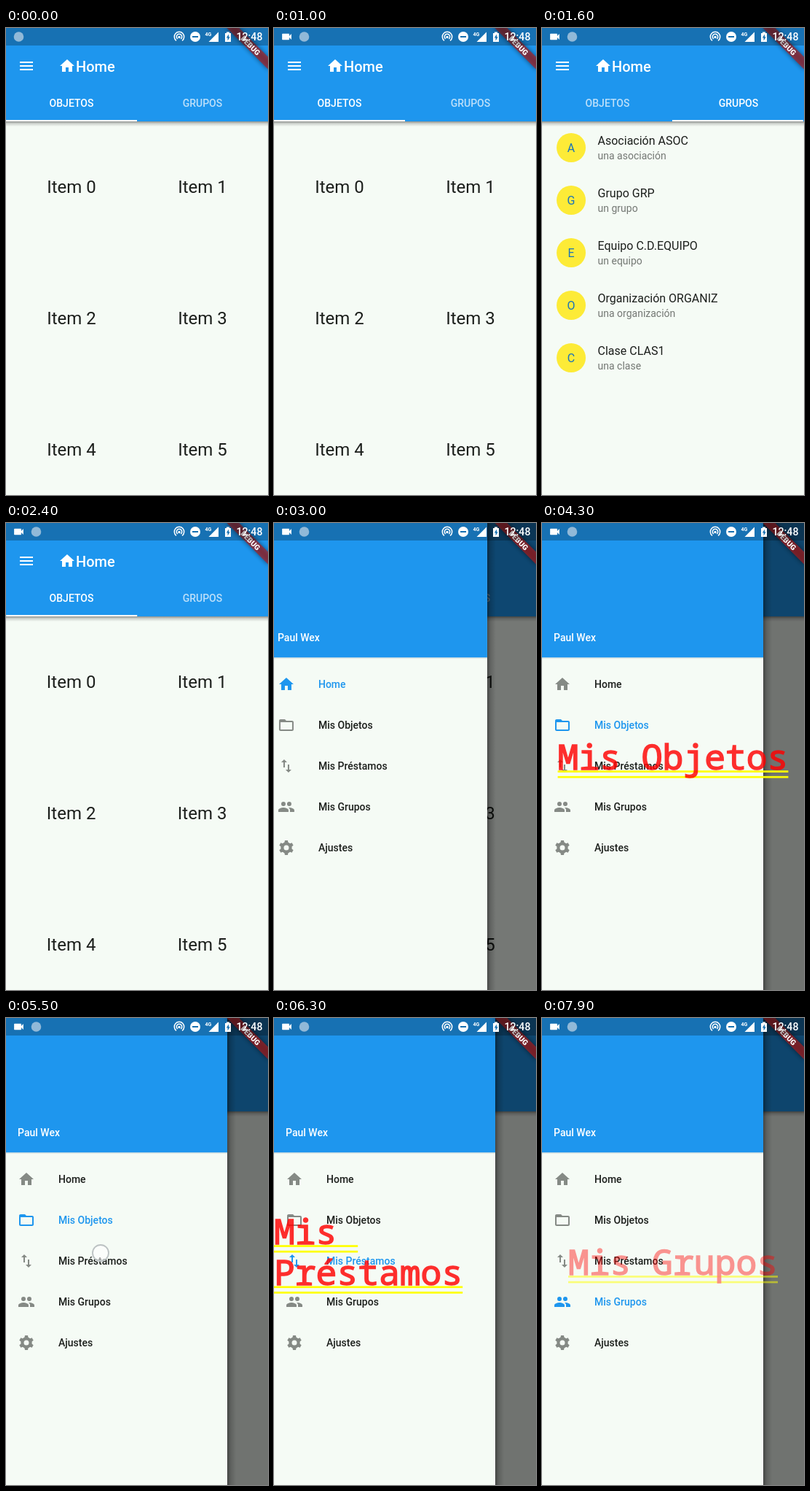
An HTML page for the animation above (8000 ms loop, 360 by 640 pixels).

```html
<!DOCTYPE html>
<html lang="es">
<head>
<meta charset="utf-8">
<title>Home</title>
<style>
html, body { margin: 0; width: 100%; height: 100%; overflow: hidden; background: #f5fbf5; }
svg { display: block; width: 100%; height: 100%; font-family: Roboto, sans-serif; }
text { white-space: pre; }
.mid { text-anchor: middle; }
.med { font-weight: 500; }
.toast text { font: 48px "Noto Sans Mono", monospace; fill: #f00; stroke: #f00; stroke-width: 1.5px; }
</style>
</head>
<body>
<svg id="stage" viewBox="0 0 360 640"></svg>
<script>
const BLUE = '#1e96ee', PAPER = '#f5fbf5', INK = '#1c1f1c', GREY = '#858a85';
const LOOP = 8000;

const ICONS = {
  menu: '<path d="M3 18h18v-2H3v2zm0-5h18v-2H3v2zm0-7v2h18V6H3z"/>',
  home: '<path d="M10 20v-6h4v6h5v-8h3L12 3 2 12h3v8z"/>',
  folder: '<path d="M20 6h-8l-2-2H4c-1.1 0-2 .9-2 2v12c0 1.1.9 2 2 2h16c1.1 0 2-.9 2-2V8c0-1.1-.9-2-2-2zm0 12H4V8h16v10z"/>',
  swap: '<path d="M9 3L5 7h3v7h2V7h3L9 3zm7 14v-7h-2v7h-3l4 4 4-4h-3z"/>',
  group: '<circle cx="16" cy="8" r="3"/><circle cx="8" cy="8" r="3"/>' +
    '<path d="M8 13c-2.3 0-7 1.2-7 3.5V19h14v-2.5c0-2.3-4.7-3.5-7-3.5zm8 0-1 .1c1.2.8 2 1.9 2 3.4V19h6v-2.5c0-2.3-4.7-3.5-7-3.5z"/>',
  gear: '<circle cx="12" cy="12" r="5.6" fill="none" stroke="currentColor" stroke-width="4.2"/>' +
    [0, 60, 120, 180, 240, 300].map(a =>
      `<path d="M10 2h4l.7 4H9.3z" transform="rotate(${a} 12 12)"/>`).join(''),
  video: '<path d="M17 10.5V7c0-.6-.4-1-1-1H4c-.6 0-1 .4-1 1v10c0 .6.4 1 1 1h12c.6 0 1-.4 1-1v-3.5l4 4v-11z"/>'
};

const icon = (name, cx, cy, color = '#fff', size = 24, attrs = '') =>
  `<g ${attrs} fill="currentColor" color="${color}" transform="translate(${cx - size / 2} ${cy - size / 2}) scale(${size / 24})">${ICONS[name]}</g>`;
const text = (str, x, y, size, fill, cls = '', attrs = '') =>
  `<text x="${x}" y="${y}" font-size="${size}" fill="${fill}" class="${cls}" ${attrs}>${str}</text>`;
const rect = (x, y, w, h, fill, attrs = '') =>
  `<rect x="${x}" y="${y}" width="${w}" height="${h}" fill="${fill}" ${attrs}/>`;
const fade = (id, dir, alpha) =>
  `<linearGradient id="${id}" ${dir}><stop stop-opacity="${alpha}"/><stop offset=".4" stop-opacity="${alpha * .4}"/><stop offset="1" stop-opacity="0"/></linearGradient>`;

const groups = [
  ['Asociación ASOC', 'una asociación'],
  ['Grupo GRP', 'un grupo'],
  ['Equipo C.D.EQUIPO', 'un equipo'],
  ['Organización ORGANIZ', 'una organización'],
  ['Clase CLAS1', 'una clase']
];
const menu = [
  ['home', 'Home'], ['folder', 'Mis Objetos'], ['swap', 'Mis Préstamos'],
  ['group', 'Mis Grupos'], ['gear', 'Ajustes']
];
const toasts = [
  { lines: ['Mis Objetos'], x: 21.6, y: 338, from: 3520, to: 4680 },
  { lines: ['Mis ', 'Préstamos'], x: 0, y: 310, from: 5720, to: 6860 },
  { lines: ['Mis Grupos'], x: 36, y: 338, from: 7800, to: 8960 }
];
const taps = [
  { x: 130, y: 270, from: 3180, to: 3380 },
  { x: 130, y: 322, from: 5180, to: 5560 },
  { x: 130, y: 383, from: 7300, to: 7620 }
];

function pages() {
  let out = '<g id="pages">';
  for (let i = 0; i < 6; i++)
    out += text('Item ' + i, 90 + i % 2 * 180, 226 + (i >> 1) * 180, 24, INK, 'mid');
  groups.forEach(([name, note], i) => {
    const y = 164 + i * 72;
    out += `<circle cx="398" cy="${y}" r="20" fill="#fdeb37"/>` +
      text(name[0], 398, y + 6, 16, '#1c74b8', 'mid') +
      text(name, 434.5, y - 4, 16, INK) + text(note, 434.5, y + 16, 14, '#747874');
  });
  return out + '</g>';
}

function appBar() {
  return rect(0, 128, 360, 7, 'url(#below)') + rect(0, 0, 360, 128, BLUE) +
    icon('menu', 28, 52) + icon('home', 84, 52) + text('Home', 96, 60, 20, '#fff', 'med') +
    text('OBJETOS', 90, 108, 14, '#fff', 'mid med', 'id="tab0"') +
    text('GRUPOS', 270, 108, 14, '#fff', 'mid med', 'id="tab1"') +
    rect(0, 126, 180, 2, '#fff', 'id="bar"');
}

function drawer() {
  const rows = menu.map(([name, label], i) => {
    const y = 221 + i * 56;
    return `<g class="row">${icon(name, 28, y, GREY)}${text(label, 72, y + 5, 14, INK, 'med')}</g>`;
  });
  return rect(0, 0, 360, 640, '#000', 'id="scrim"') +
    '<g id="drawer">' + rect(304, 0, 12, 640, 'url(#beside)') + rect(0, 0, 304, 640, PAPER) +
    rect(0, 0, 304, 184.5, BLUE) + rect(0, 184.5, 304, 1, '#d4dcd8') +
    text('Paul Wex', 16, 162, 14, '#fff', 'med') + rows.join('') + '</g>';
}

function toastMarkup({ lines, x, y }) {
  const body = lines.map((str, i) => {
    const base = y + i * 56.2, w = str.length * 28.8;
    return rect(x, base + 1.2, w, 2.7, '#ff0') + rect(x, base + 8.8, w, 2.7, '#ff0') +
      `<text x="${x}" y="${base}" opacity=".82">${str}</text>`;
  });
  return `<g class="toast">${body.join('')}</g>`;
}

function banner() {
  return '<g transform="translate(360 0) rotate(45)">' +
    rect(-40, 28, 80, 12, '#000', 'opacity=".5" filter="url(#soft)"') +
    rect(-40, 28, 80, 12, '#b71c1c', 'opacity=".63"') +
    text('DEBUG', 0, 37.6, 10.2, '#fff', 'mid', 'font-weight="900"') + '</g>';
}

function statusBar() {
  const ring = r => `<path d="M${238 - r * .6} ${12 + r * .8}A${r} ${r} 0 1 1 ${238 + r * .6} ${12 + r * .8}" fill="none" stroke="#fff" stroke-width="1.5"/>`;
  return rect(0, 0, 360, 24, '#000', 'opacity=".25"') +
    icon('video', 17.5, 12, '#fff', 17, 'id="video"') +
    '<circle id="spot" cy="12" r="6.8" fill="#91b9d8"/>' +
    ring(6.7) + ring(3.7) + '<circle cx="238" cy="12.5" r="1.7" fill="#fff"/>' +
    '<circle cx="260" cy="12" r="7" fill="#fff"/>' + rect(256, 11, 8, 2, '#1670b1') +
    text('4G', 273.5, 11, 7, '#fff', '', 'font-weight="700"') +
    '<path d="M292 5.5V19h-13.5z" fill="#fff"/>' +
    '<path d="M303 5.5h4V7h2v12h-8V7h2z" fill="#fff"/><path d="M306 8.5l-3.2 5h1.8V17.500l3.100-5.200H306z" fill="#1670b1"/>' +
    text('12:48', 352.500, 17, 14.2, '#fff', 'med', 'text-anchor="end"');
}

const stage = document.getElementById('stage');
stage.innerHTML =
  '<defs>' + fade('below', 'x2="0" y2="1"', .42) + fade('beside', '', .4) +
  '<filter id="soft" x="-20%" y="-100%" width="140%" height="300%"><feGaussianBlur stdDeviation="3"/></filter></defs>' +
  rect(0, 0, 360, 640, PAPER) + pages() + appBar() + drawer() +
  toasts.map(toastMarkup).join('') + banner() + statusBar() +
  taps.map(p => `<circle class="tap" cx="${p.x}" cy="${p.y}" r="11" fill="#fff" fill-opacity=".55" stroke="#bcc2c3" stroke-width="1.800"/>`).join('');

const el = id => document.getElementById(id);
const all = sel => [...stage.querySelectorAll(sel)];
const ui = {
  pages: el('pages'), bar: el('bar'), tabs: [el('tab0'), el('tab1')],
  scrim: el('scrim'), drawer: el('drawer'), video: el('video'), spot: el('spot'),
  rows: all('.row'), toasts: all('.toast'), taps: all('.tap')
};
const set = (node, name, value) => node.setAttribute(name, value);
const ramp = (t, from, len) => Math.min(1, Math.max(0, (t - from) / len));
const easeOut = p => 1 - (1 - p) ** 3;
const pulse = (t, from, to, len) => ramp(t, from, len) - ramp(t, to, len);

function draw(t) {
  const page = easeOut(ramp(t, 1100, 610)) - easeOut(ramp(t, 1900, 560));
  set(ui.pages, 'transform', `translate(${-360 * page} 0)`);
  set(ui.bar, 'x', 180 * page);
  set(ui.tabs[0], 'opacity', 1 - .3 * page);
  set(ui.tabs[1], 'opacity', .7 + .3 * page);

  const open = easeOut(ramp(t, 2650, 525));
  set(ui.scrim, 'opacity', .54 * open);
  set(ui.drawer, 'transform', `translate(${304 * (open - 1)} 0)`);
  set(ui.drawer, 'visibility', open > 0 ? 'visible' : 'hidden');

  const chosen = [3450, 5660, 7720].filter(start => t >= start).length;
  ui.rows.forEach((row, i) => {
    set(row.children[0], 'color', i === chosen ? BLUE : GREY);
    set(row.children[1], 'fill', i === chosen ? BLUE : INK);
  });

  ui.toasts.forEach((node, i) => {
    const p = pulse(t, toasts[i].from, toasts[i].to, 200);
    set(node, 'opacity', p);
    set(node, 'transform', `translate(0 ${t < toasts[i].to ? 28 * (1 - p) : 0})`);
  });
  ui.taps.forEach((node, i) => set(node, 'opacity', pulse(t, taps[i].from, taps[i].to, 100)));

  const recording = t >= 300;
  set(ui.video, 'visibility', recording ? 'visible' : 'hidden');
  set(ui.spot, 'cx', recording ? 41.5 : 17.5);
}

const begin = performance.now();
function tick() {
  draw((performance.now() - begin) % LOOP);
  requestAnimationFrame(tick);
}
tick();
</script>
</body>
</html>
```
